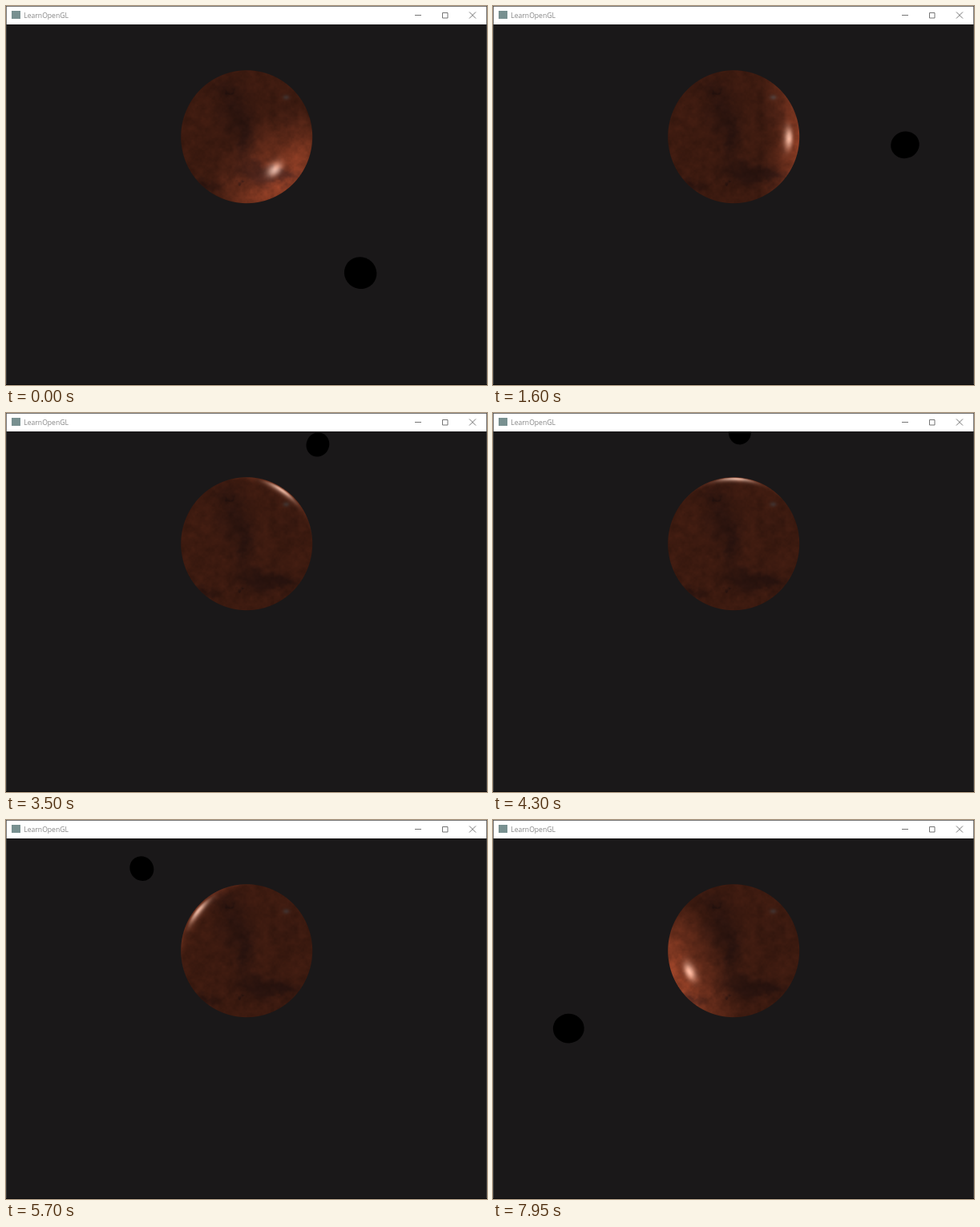
An HTML page with a canvas for the animation above (8 s loop, 600 by 473 pixels).

```html
<!DOCTYPE html>
<html lang="en">
<head>
<meta charset="utf-8">
<title>LearnOpenGL</title>
<style>
  html, body { margin: 0; width: 100%; height: 100%; overflow: hidden; background: #1a1819; }
  canvas, svg { position: absolute; left: 0; top: 0; display: block; }
  text { font: 8.6px "Open Sans", "Noto Sans", sans-serif; fill: #858585; }
</style>
</head>
<body>
<canvas id="scene" width="600" height="473"></canvas>
<svg width="600" height="473">
  <rect width="600" height="23" fill="#fff"/>
  <path d="M0 .5H600M.5 0V473M599.5 0V473" stroke="#4a4a4a" stroke-opacity=".75" fill="none"/>
  <path d="M0 472.5H600" stroke="#0d0c0d"/>
  <rect x="7" y="6" width="11" height="10" fill="#789090"/>
  <text x="22.3" y="15">LearnOpenGL</text>
  <path d="M510 11.5H518M544.5 8.5h6.5v6.5h-6.5zM578 7.5l8 8M586 7.5l-8 8" fill="none" stroke="#666" stroke-width=".9"/>
</svg>
<script>
const LOOP = 8000, STEP = 50;
const ctx = document.getElementById('scene').getContext('2d');
const planet = { x: 300.2, y: 163.2, rx: 82, ry: 83 };
const BOX = { x: 216, y: 78, size: 170 };
const CAMERA = 6.7, ORBIT = 2.6;   // distances in planet radii
const AMBIENT = 0.3, DIFFUSE = 0.43, SHININESS = 32;
const SPECULAR = [142, 138, 132];

const clamp = (v, lo = 0, hi = 1) => Math.min(hi, Math.max(lo, v));
const mix = (a, b, k) => a + (b - a) * k;

function hash(x, y) {
  const v = Math.sin(x * 127.1 + y * 311.7) * 43758.5453;
  return v - Math.floor(v);
}

function noise(x, y) {
  const ix = Math.floor(x), iy = Math.floor(y);
  const ease = f => f * f * (3 - 2 * f);
  const fx = ease(x - ix), fy = ease(y - iy);
  return mix(mix(hash(ix, iy), hash(ix + 1, iy), fx),
             mix(hash(ix, iy + 1), hash(ix + 1, iy + 1), fx), fy);
}

const fbm = (x, y) =>
  noise(x, y) * 0.5 + noise(x * 2.1, y * 2.1) * 0.3 + noise(x * 4.3, y * 4.3) * 0.2;

// Dark plains: x, y, horizontal radius, vertical radius, strength
const plains = [
  [284, 126, 19, 27, .55], [297, 165, 11, 24, .65], [313, 208, 24, 14, .65],
  [349, 212, 20, 9, .65], [250, 222, 15, 6, .6], [268, 100, 11, 11, .35],
  [291, 222, 3, 2, .6], [277, 105, 3, 2, .4], [352, 137, 22, 14, .15]
];

function surfaceColor(x, y) {
  const wx = x + (fbm(x / 12, y / 12) - .5) * 18;
  const wy = y + (fbm(x / 12 + 40, y / 12) - .5) * 18;
  let dark = 0;
  for (const [px, py, rx, ry, strength] of plains) {
    dark += strength * Math.exp(-(((wx - px) / rx) ** 2 + ((wy - py) / ry) ** 2));
  }
  dark = clamp(dark, 0, .95);
  const tone = .82 + .36 * fbm(x / 9 + 7, y / 9 + 3);
  const crater = .55 * Math.exp(-(((x - 349) / 4) ** 2 + ((y - 113.5) / 3) ** 2));
  const light = [200, 87, 52], shade = [102, 50, 43], dust = [215, 215, 220];
  return light.map((c, i) => mix(mix(c, shade[i], dark) * tone, dust[i], crater));
}

// Surface point, view direction and colour for every pixel of the planet
const pixels = [];
for (let j = 0; j < BOX.size; j++) {
  for (let i = 0; i < BOX.size; i++) {
    const x = BOX.x + i, y = BOX.y + j;
    const u = (x + .5 - planet.x) / planet.rx, v = (y + .5 - planet.y) / planet.ry;
    const rho = Math.hypot(u, v);
    const alpha = clamp((1 - rho) * planet.rx + .5);
    if (!alpha) continue;
    const slope = 1 / Math.sqrt(CAMERA ** 2 - 1);
    const depth = (CAMERA - Math.sqrt(Math.max(0, 1 - rho * rho))) / (1 + (rho * slope) ** 2);
    const n = [u * slope * depth, v * slope * depth, CAMERA - depth];
    const toEye = [-n[0], -n[1], CAMERA - n[2]];
    const len = Math.hypot(...toEye);
    pixels.push({ at: 4 * (j * BOX.size + i), alpha, n,
                  view: toEye.map(c => c / len), color: surfaceColor(x, y) });
  }
}

const layer = document.createElement('canvas');
layer.width = layer.height = BOX.size;
const layerCtx = layer.getContext('2d');
const image = layerCtx.createImageData(BOX.size, BOX.size);

function drawPlanet(sin, cos) {
  const lamp = [ORBIT * sin, -ORBIT * .82 * cos, -ORBIT * .57 * cos];
  for (const { at, alpha, n, view, color } of pixels) {
    const lx = lamp[0] - n[0], ly = lamp[1] - n[1], lz = lamp[2] - n[2];
    const len = Math.hypot(lx, ly, lz);
    const facing = (lx * n[0] + ly * n[1] + lz * n[2]) / len;
    const along = (lx * view[0] + ly * view[1] + lz * view[2]) / len;
    const eye = n[0] * view[0] + n[1] * view[1] + n[2] * view[2];
    const mirror = Math.max(0, 2 * facing * eye - along);
    const spec = mirror ** SHININESS;
    const lit = AMBIENT + DIFFUSE * Math.max(0, facing);
    for (let c = 0; c < 3; c++) image.data[at + c] = color[c] * lit + SPECULAR[c] * spec;
    image.data[at + 3] = 255 * alpha;
  }
  layerCtx.putImageData(image, 0, 0);
  ctx.drawImage(layer, BOX.x, BOX.y);
}

function drawMoon(sin, cos) {
  const w = 1 + .19 * cos;
  const x = 300 + (213 * sin + 3 * cos) / w;
  const y = (167.5 + sin - 138.5 * cos) / w;
  const dx = x - 300, dy = y - 248;
  const r = 16.6 / w, stretch = 1 + 1.4e-6 * (dx * dx + dy * dy);
  ctx.fillStyle = '#000';
  ctx.beginPath();
  ctx.ellipse(x, y, r * stretch, r, Math.atan2(dy, dx), 0, 2 * Math.PI);
  ctx.fill();
}

function draw(ms) {
  const angle = (144.9 - 33.3 * ms / 1000) * Math.PI / 180;
  const sin = Math.sin(angle), cos = Math.cos(angle);
  ctx.fillStyle = '#1a1819';
  ctx.fillRect(0, 0, 600, 473);
  drawPlanet(sin, cos);
  drawMoon(sin, cos);
}

const start = performance.now();
let shown = -1;
function tick() {
  const ms = Math.floor((performance.now() - start) % LOOP / STEP) * STEP;
  if (ms !== shown) draw(shown = ms);
  requestAnimationFrame(tick);
}
tick();
</script>
</body>
</html>
```
